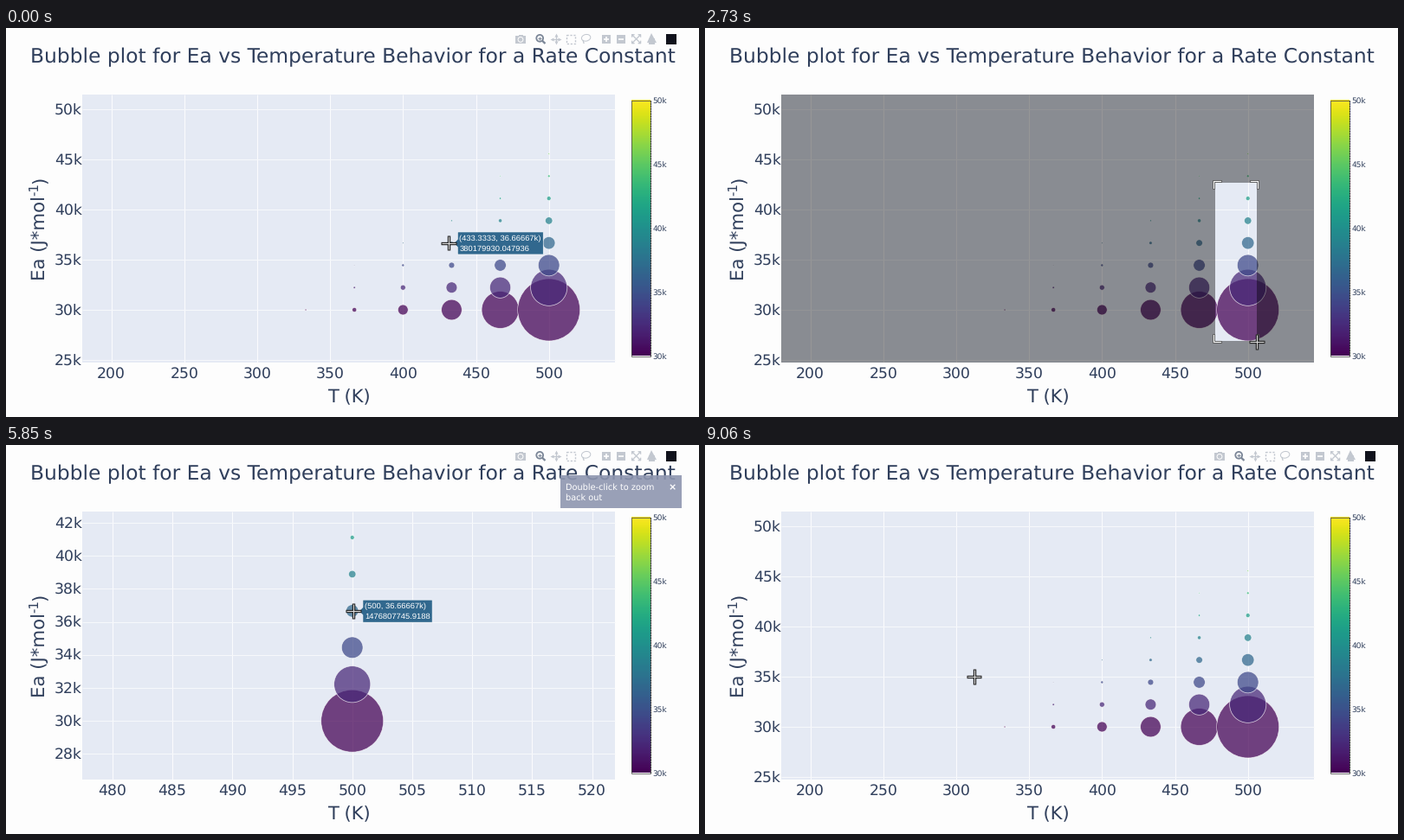
These frames come from a looping animation (800x450 px, 9090 ms). A matplotlib script:

```python
import numpy as np
import matplotlib.pyplot as plt
from matplotlib.animation import FuncAnimation
from matplotlib.patches import Circle, Ellipse, PathPatch, Polygon, Rectangle
from matplotlib.path import Path

plt.rcParams["font.family"] = "DejaVu Sans"
plt.rcParams["text.hinting"] = "none"

STEP, FRAMES = 30, 303
PT = 0.72                                # points per pixel at 100 dpi
L, R, T, B = 88.3, 703, 76.5, 387        # plot area
INK, PAPER, GREY, ACTIVE = "#303f5c", "#fdfdfd", "#c3c8d0", "#7c8798"
VIRIDIS = plt.get_cmap("viridis")

PRESS, RELEASE, CLICK, RESET = 1930, 3660, 7910, 8480
LAG = 40                                 # the page reacts a little after the pointer
ANCHOR = (588.5, 178.5)

# Pointer stops: ms, x, y
STOPS = np.array([
    (300, 511, 248.5), (1790, *ANCHOR), (1950, *ANCHOR), (2010, 597, 229),
    (2730, 637, 363), (3300, 663.5, 367.5), (3700, 663.5, 367.5),
    (4600, 403, 115), (5480, 402, 172), (6500, 398, 238),
    (6900, 391, 281), (6960, 375, 317), (7700, 310.5, 268)])

# Arrhenius data
TEMPS = np.linspace(200, 500, 10)
ENERGY = np.linspace(30e3, 50e3, 10)
GAS = ENERGY[1] / (500 * np.log(1e13 / 4301781325.10093))
TT, EE = (a.ravel() for a in np.meshgrid(TEMPS, ENERGY))
RATE = 1e13 * np.exp(-EE / (GAS * TT))
RADIUS = 36 * RATE / RATE.max()
COLORS = VIRIDIS((EE - 30e3) / 20e3)

fig = plt.figure(figsize=(8, 4.5), dpi=100, facecolor=PAPER)
ax = fig.add_axes([0, 0, 1, 1])
ax.set_xlim(0, 800)
ax.set_ylim(450, 0)
ax.axis("off")


def ramp(t, start, length=290):
    return np.clip((t - start) / length, 0, 1)


def pointer(t):
    k = np.clip(np.searchsorted(STOPS[:, 0], t), 1, len(STOPS) - 1)
    a, b = STOPS[k - 1], STOPS[k]
    u = ramp(t, a[0], b[0] - a[0])
    return a[1:] + (b - a)[1:] * u * u * (3 - 2 * u)


def add(patch):
    ax.add_artist(patch)
    return patch


def rect(x0, y0, x1, y1, color, **kw):
    return add(Rectangle((x0, y0), x1 - x0, y1 - y0, fc=color, **{"lw": 0, **kw}))


def line(xs, ys, color, width=1.0, **kw):
    kw = {"solid_capstyle": "butt", **kw}
    return ax.plot(xs, ys, color=color, lw=width * PT, **kw)[0]


def label(x, y, s, size, color=INK, **kw):
    return ax.text(x, y, s, fontsize=size * PT, color=color, **kw)


def compound(polys):
    verts, codes = [], []
    for p in polys:
        verts += list(p) + [p[0]]
        codes += [Path.MOVETO] + [Path.LINETO] * (len(p) - 1) + [Path.CLOSEPOLY]
    return Path(verts, codes)


def box(x0, y0, x1, y1):
    return [(x0, y0), (x1, y0), (x1, y1), (x0, y1)]


def plus_data(x, y, arm):
    return [x - arm, x + arm, np.nan, x, x], [y, y, np.nan, y - arm, y + arm]


area = rect(L, T, R, B, "#e5eaf4", zorder=0)


class View:
    """Grid, tick labels and bubbles for one axis range."""

    def __init__(self, x_ref, x_scale, x_ticks, y_ref, y_scale, y_ticks):
        def fx(v):
            return x_ref[1] + (v - x_ref[0]) * x_scale

        def fy(v):
            return y_ref[1] - (v - y_ref[0]) * y_scale

        self.x, self.y = fx(TT), fy(EE / 1e3)
        self.hot = np.flatnonzero((self.x > L) & (self.x < R)
                                  & (self.y > T) & (self.y < B))
        gx = [v for t in x_ticks for v in (fx(t), fx(t), np.nan)]
        gy = [v for t in y_ticks for v in (fy(t), fy(t), np.nan)]
        self.parts = [
            line(gx, [T, B, np.nan] * len(x_ticks), "#fafbfd", 1.1, zorder=1),
            line([L, R, np.nan] * len(y_ticks), gy, "#f6f8fb", 1, zorder=1)]
        for t in x_ticks:
            self.parts.append(label(fx(t), 404.4, str(t), 17.25, ha="center"))
        for t in y_ticks:
            self.parts.append(label(88, fy(t) + 6.3, f"{t}k", 17.25, ha="right"))
        seen = self.hot[RADIUS[self.hot] > 0.6]
        dots = ax.scatter(self.x[seen], self.y[seen], s=(2 * RADIUS[seen] * PT) ** 2,
                          c=COLORS[seen], edgecolors="white", linewidths=0.75 * PT,
                          alpha=0.73, zorder=2)
        dots.set_clip_path(area)
        self.parts.append(dots)

    def show(self, on):
        for p in self.parts:
            p.set_visible(on)

    def nearest(self, px, py):
        """Index of the hovered point, or None."""
        rad = np.maximum(3, RADIUS[self.hot])
        d = np.hypot(self.x[self.hot] - px, self.y[self.hot] - py) - rad
        d = np.maximum(d, 1 - 3 / rad)
        k = d.argmin()
        return self.hot[k] if d[k] < 17 else None


full = View((200, 121.5), 1.684, range(200, 501, 50),
            (50, 94), 11.6, range(25, 51, 5))
zoomed = View((500, 399.7), 13.84, range(480, 521, 5),
              (42, 90), 19.1, range(28, 43, 2))

# Titles
label(400.5, 40.3, "Bubble plot for Ea vs Temperature Behavior for a Rate Constant",
      23.35, ha="center")
label(395.5, 433, "T (K)", 21, ha="center")
for x, y, s, size in ((46, 292.5, "Ea (J*mol", 21.3), (37, 194, "-1", 15),
                      (46, 179.5, ")", 21.3)):
    label(x, y, s, size, rotation=90, rotation_mode="anchor")

# Colour bar
ax.imshow(np.linspace(0, 0.97, 256)[:, None], cmap=VIRIDIS, aspect="auto",
          origin="lower", extent=(722, 743.5, 379.5, 83.5), zorder=1)
rect(722, 83.5, 743.5, 379.5, "none", ec="#444444", lw=0.75 * PT, zorder=2)
line([743.5, 743.5], [83.5, 379.5], "#222222", 1.2, ls=(0, (1, 1.4)), zorder=3)
for k in range(30, 51, 5):
    label(746.5, 382.9 - (k - 30) * 14.8, f"{k}k", 9)

# Tool bar, all icons centred on one line
MID = 12.7


def icon(x, marker, size, color=GREY, y=MID):
    return line([x], [y], color, marker=marker, markersize=size * PT, markeredgewidth=0)


bar = [
    rect(588, 9.3, 600, 17.7, GREY), rect(591.5, 7.8, 596.5, 10, GREY),
    add(Circle((594, 13.4), 2.9, fc=GREY, ec=PAPER, lw=PT)),
    add(Circle((616.2, 11.8), 3.9, fc="none", ec=ACTIVE, lw=1.8 * PT)),
    line([619, 622.5], [14.7, 18], ACTIVE, 2.3),
    line(*plus_data(616.2, 11.8, 2), ACTIVE),
    line(*plus_data(634.7, MID, 4), GREY, 1.3),
    rect(646.8, 7.6, 657.4, 18, "none", ec=GREY, lw=1.4 * PT, ls=(0, (1.6, 1.2))),
    add(Ellipse((669.6, 11.3), 10.5, 7.6, angle=-12, fc="none", ec=GREY, lw=PT)),
    line([666, 667.2], [14, 18], GREY, 1.3),
    icon(692.7, "s", 10.8), line(*plus_data(692.7, MID, 3), PAPER, 1.7),
    icon(710.3, "s", 10.8), line([707.3, 713.3], [MID, MID], PAPER, 1.7),
    icon(745, "^", 11, y=10.5), icon(745, "s", 7, y=14.6),
    icon(768, "s", 12, "#10121c"),
]
for k, marker in enumerate(">v<^"):
    a = k * np.pi / 2
    bar.append(icon(634.7 + 4.5 * np.cos(a), marker, 4, y=MID + 4.5 * np.sin(a)))
for sx in (-1, 1):
    for sy in (-1, 1):
        x, y = 727.6 + 5 * sx, MID + 5 * sy
        bar.append(line([x - 3 * sx, x, x, np.nan, x, 727.6],
                        [y, y, y - 3 * sy, np.nan, y, MID], GREY, 1.3))

# Zoom selection
shade = add(PathPatch(compound([box(L, T, R, B)]), fc="black", lw=0, zorder=4))
marks = add(PathPatch(compound([box(0, 0, 1, 1)]), fc="white", ec="#444444",
                      lw=0.75 * PT, zorder=5))
GAP, OUT, ARM = 0.4, 2.65, 7.5


def corner(x, y, sx, sy):
    near_x, far_x = x + sx * GAP, x + sx * OUT
    near_y, far_y = y + sy * GAP, y + sy * OUT
    return [(far_x, y - sy * ARM), (near_x, y - sy * ARM), (near_x, near_y),
            (x - sx * ARM, near_y), (x - sx * ARM, far_y), (far_x, far_y)]


def draw_selection(t):
    on = PRESS + LAG <= t < RELEASE
    shade.set_visible(on)
    marks.set_visible(on)
    if not on:
        return
    (x0, y0), (x1, y1) = ANCHOR, pointer(t - LAG)
    if x1 - x0 < 8:                      # a narrow drag selects a full-width band
        hole = box(L, y0, R, y1)
        grips = [box(x0 - 15, y + s * GAP, x0 + 15, y + s * OUT)
                 for y, s in ((y0, -1), (y1, 1))]
    else:
        hole = box(x0, y0, x1, y1)
        grips = [corner(x, y, sx, sy) for x, sx in ((x0, -1), (x1, 1))
                 for y, sy in ((y0, -1), (y1, 1))]
    dim = ramp(t, PRESS + 55, 200)
    shade.set_path(compound([box(L, T, R, B), hole[::-1]]))
    shade.set_alpha(0.4 * dim)
    marks.set_path(compound(grips))
    marks.set_alpha(dim)


# Hover label
tip = add(Polygon([(0, 0), (1, 0), (1, 1)], ec="white", lw=0.6 * PT, zorder=6))
tip_text = [label(0, 0, "", 9.4, "white", family="Liberation Sans", zorder=7)
            for _ in range(2)]


def draw_hover(t, view):
    busy = PRESS <= t < RELEASE or t >= CLICK
    k = None if busy else view.nearest(*pointer(t - LAG))
    for a in [tip, *tip_text]:
        a.set_visible(k is not None)
    if k is None:
        return
    x, y = view.x[k] + RADIUS[k], view.y[k] + 0.3
    left = x + 5
    rows = (f"({TT[k]:.7g}, {EE[k] / 1e3:.7g}k)", f"{RATE[k]:.15g}")
    for a, s, dy in zip(tip_text, rows, (-2.6, 9.2)):
        a.set_text(s)
        a.set_position((left + 2.2, y + dy))
    right = left + 4.5 + max(a.get_window_extent().width for a in tip_text)
    tip.set_xy([(x + 0.5, y), (left, y - 4.5), *box(left, y - 13, right, y + 13),
                (left, y + 4.5)])
    tip.set_facecolor(COLORS[k])


# Notice
notice = rect(639.5, 35.3, 780.3, 72.7, "#8e96b0", zorder=8)
notice_text = [label(646, 52, "Double-click to zoom", 9.75, "white", zorder=9),
               label(646, 63.7, "back out", 9.75, "white", zorder=9),
               label(769.3, 52.5, "×", 11, "white", weight="bold", ha="center", zorder=9)]

cross = [line([], [], "#222222", 3.4, zorder=10), line([], [], "#dcdcdc", 1.1, zorder=11)]


def fade(artists, alpha):
    for p in artists:
        p.set_alpha(alpha)
        p.set_visible(alpha > 0)


def update(i):
    t = i * STEP
    inside = RELEASE <= t < RESET
    full.show(not inside)
    zoomed.show(inside)
    fade(bar, 1 - ramp(t, PRESS) + ramp(t, RELEASE) - ramp(t, CLICK) + ramp(t, RESET))
    shown = ramp(t, RELEASE + 20, 220) - ramp(t, 6735)
    fade([notice], 0.9 * shown)
    fade(notice_text, min(1, 2 * shown))
    draw_selection(t)
    draw_hover(t, zoomed if inside else full)
    for c, arm in zip(cross, (8.8, 7.8)):
        c.set_data(*plus_data(*pointer(t), arm))
    return []


anim = FuncAnimation(fig, update, frames=FRAMES, interval=STEP, repeat=True,
                     repeat_delay=0, init_func=lambda: update(0))
plt.show()
```
